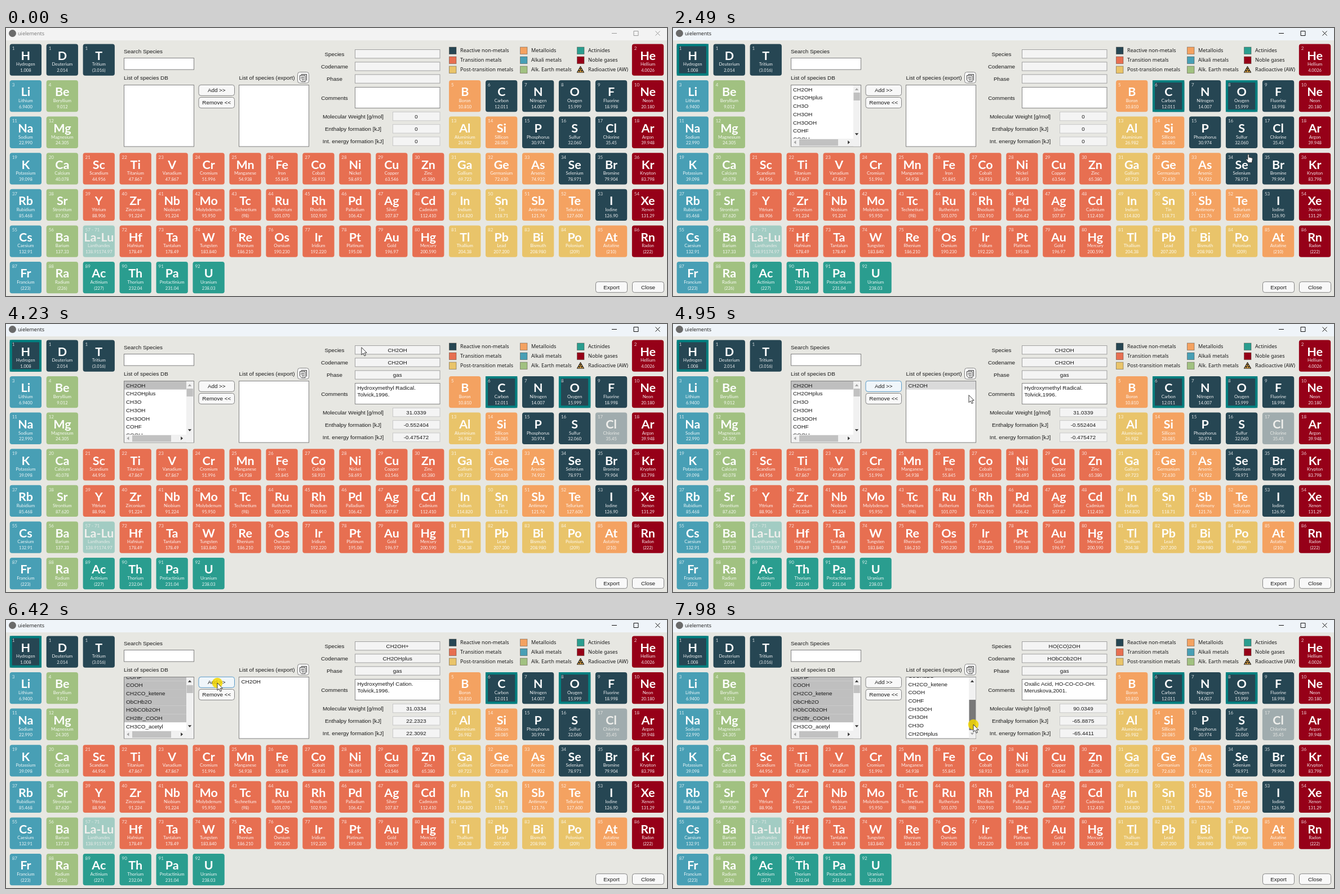
These frames come from a looping animation (1173x477 px, 8000 ms). An HTML page:

```html
<!DOCTYPE html>
<html lang="en">
<head>
<meta charset="utf-8">
<title>uielements</title>
<style>
html, body { margin: 0; width: 100%; height: 100%; overflow: hidden; background: #e7e7e2; }
svg { display: block; width: 100vw; height: 100vh; }
text { font: 9.85px "Liberation Sans", Arial, sans-serif; fill: #1a1a1a; white-space: pre; }
.mid { text-anchor: middle; }
.sym { font: 700 21.5px Lato, sans-serif; fill: #fff; }
.name { font: 7.8px Lato, sans-serif; fill: #fff; fill-opacity: .92; }
.mass { font: 7.6px Lato, sans-serif; fill: #fff; fill-opacity: .92; }
.num { font: 8px Lato, sans-serif; fill: #fff; fill-opacity: .8; }
.key { font: 9.15px "Noto Sans", "Open Sans", sans-serif; }
.title { font: 9.1px "Open Sans", "Noto Sans", sans-serif; }
</style>
</head>
<body>
<svg id="stage" viewBox="0 0 1173 477" preserveAspectRatio="none"></svg>
<script>
const LOOP = 8000, STEP = 30, ROW = 14.72;
const stage = document.getElementById('stage');

function el(tag, attrs, parent = stage, text) {
  const node = document.createElementNS('http://www.w3.org/2000/svg', tag);
  set(node, attrs);
  if (text !== undefined) node.textContent = text;
  parent.appendChild(node);
  return node;
}
function set(node, attrs) {
  for (const k in attrs) node.setAttribute(k, attrs[k]);
}
function box(x, y, w, h, fill, stroke = 'none', rx = 0, parent = stage) {
  return el('rect', { x, y, width: w, height: h, fill, stroke, rx }, parent);
}
// y is the middle of the line
function label(x, y, text, cls = '', parent = stage) {
  return el('text', { x, y: y + 3.5, class: cls }, parent, text);
}
function show(node, on) { node.style.display = on ? '' : 'none'; }

// ---- title bar
box(0, 0, 1173, 477, '#e7e7e2');
const bar = box(0, 0, 1173, 22, '#f3f3f3');
el('circle', { cx: 11.5, cy: 9.5, r: 6.5, fill: '#6a6a6a' });
const title = label(21, 9.5, 'uielements', 'title');
const controls = el('path', { d: 'M1075 9.5h9M1114 5.5h8v8h-8zM1152.5 5.5l8 8M1160.5 5.5l-8 8', fill: 'none' });

// ---- periodic table
const colours = {
  n: '#264653', t: '#e76f51', p: '#e9c46a', m: '#f4a261', k: '#489fb5',
  e: '#a1c181', a: '#2a9d8f', g: '#960018', l: '#2a9d8f'
};
const table = [
  ['nnng', 'H Hydrogen 1.008,D Deuterium 2.014,T Tritium (3.016),He Hellium 4.0026'],
  ['kemnnnng', 'Li Lithium 6.9400,Be Beryllium 9.012,B Boron 10.810,C Carbon 12.011,N Nitrogen 14.007,O Oxygen 15.999,F Fluorine 18.998,Ne Neon 20.180'],
  ['kepmnnng', 'Na Sodium 22.990,Mg Magnesium 24.305,Al Aluminium 26.982,Si Sillicon 28.085,P Phosphorus 30.974,S Sulfur 32.060,Cl Chlorine 35.45,Ar Argon 39.948'],
  ['kettttttttttpmmnng', 'K Potassium 39.098,Ca Calcium 40.078,Sc Scandium 44.956,Ti Titanium 47.867,V Vanadium 47.867,Cr Cromium 51.996,Mn Manganese 54.938,Fe Iron 55.845,Co Cobalt 58.933,Ni Nickel 58.693,Cu Copper 63.546,Zn Zinc 65.380,Ga Gallium 69.723,Ge Germanium 72.630,As Arsenic 74.922,Se Selenium 78.971,Br Bromine 79.904,Kr Krypton 83.798'],
  ['kettttttttttppmmng', 'Rb Rubidium 85.468,Sr Strontium 87.620,Y Yttrium 88.906,Zr Zirconium 91.224,Nb Niobium 91.224,Mo Molybdenum 95.950,Tc Technetium (98),Ru Rutherium 101.070,Rh Rhodium 102.910,Pd Palladium 106.42,Ag Silver 107.87,Cd Cadmium 112.410,In Indium 114.820,Sn Tin 118.71,Sb Antimony 121.76,Te Tellurium 127.600,I Iodine 126.90,Xe Xenon 131.29'],
  ['keltttttttttppppmg', 'Cs Caesium 132.91,Ba Barium 137.33,La-Lu Lanthandes 138.91174.97,Hf Hafnium 178.49,Ta Tantalum 178.49,W Tungsten 183.840,Re Rhenium 186.210,Os Osmium 190.230,Ir Iridium 192.220,Pt Platinum 195.08,Au Gold 196.97,Hg Mercury 200.590,Tl Thallium 204.38,Pb Lead 207.200,Bi Bismuth 208.980,Po Polonium (209),At Astatine (210),Rn Radon (222)'],
  ['keaaaa', 'Fr Francium (223),Ra Radium (226),Ac Actinium (227),Th Thorium 232.04,Pa Protactinium 231.04,U Uranium 238.03']
];
const tiles = {};
let count = 0;
table.forEach(([kinds, line], row) => line.split(',').forEach((item, i) => {
  const [sym, name, mass] = item.split(' ');
  const col = row === 0 && i === 3 ? 17 : (row === 1 || row === 2) && i > 1 ? i + 10 : i;
  if (sym !== 'D' && sym !== 'T') count++;
  let num = count;
  if (kinds[i] === 'l') { num = '57 - 71'; count = 71; }
  const x = 6.7 + col * 64.95, y = 28.4 + row * 64.6, cx = x + 28.2;
  const g = el('g', { opacity: kinds[i] === 'l' ? .36 : 1 });
  box(x, y, 56.3, 56.3, colours[kinds[i]], 'none', 4, g);
  const ring = el('rect', { x: x + 2, y: y + 2, width: 52.3, height: 52.3, fill: 'none', stroke: '#008080', 'stroke-width': 4 }, g);
  show(ring, false);
  el('text', { x: x + 4, y: y + 10.8, class: 'num' }, g, num);
  el('text', { x: cx, y: y + 28.3, class: 'sym mid' }, g, sym);
  el('text', { x: cx, y: y + 39, class: 'name mid' }, g, name);
  el('text', { x: cx, y: y + 49.8, class: 'mass mid' }, g, mass);
  tiles[sym] = { x, y, g, ring };
}));

// ---- legend
[[786, ['Reactive non-metals', 'Transition metals', 'Post-transition metals'], 'ntp'],
 [912, ['Metalloids', 'Alkali metals', 'Alk. Earth metals'], 'mke'],
 [1013, ['Actinides', 'Noble gases', 'Radioactive (AW)'], 'ag']
].forEach(([x, names, kinds]) => names.forEach((name, i) => {
  const y = 40 + i * 17;
  if (kinds[i]) box(x + .5, y - 6, 12.5, 12.5, colours[kinds[i]], 'rgba(60,50,40,.45)');
  label(x + 20, y - .2, name, 'key');
}));
el('path', { d: 'M1019.5 68.5l6 10.5h-12z', fill: '#f5b041', stroke: '#222', 'stroke-width': 1.2, 'stroke-linejoin': 'round' });
for (const a of [0, 120, 240])
  el('path', { d: 'M0 0L-1.8 3.1A3.6 3.6 0 0 0 1.8 3.1Z', fill: '#222', transform: `translate(1019.5 75) rotate(${a + 60})` });

// ---- left and middle panels
label(209, 41, 'Search Species');
label(209, 88, 'List of species DB');
label(413.5, 88, 'List of species (export)');
box(209.5, 53.5, 124, 20.5, '#fff', '#808080');

function button(x, y, w, text) {
  const r = box(x, y, w, 19, '#f8f8f8', '#858585', 4);
  label(x + w / 2, y + 9.4, text, 'mid');
  return r;
}
const add = button(342, 101.3, 63.5, 'Add >>');
button(342, 123.4, 63.5, 'Remove <<');
button(1046.5, 451.7, 56, 'Export');
button(1111.5, 451.7, 56, 'Close');
box(517.5, 78.5, 20, 19.5, '#f8f8f8', '#858585', 4);
el('path', { d: 'M524 82.5h9.5v11M524 82.5v1', fill: 'none', stroke: '#333' });
el('path', { d: 'M521.5 84.5h9.5v11h-6.5l-3-3zM523.5 87.5h5.5M523.5 90h5.5M525 92.5h4', fill: '#fff', stroke: '#222', 'stroke-width': .9 });

// ---- details panel
['Species', 'Codename', 'Phase'].forEach((s, i) => label(583, 46.3 + i * 22.2, s, 'mid'));
label(583, 124, 'Comments', 'mid');
const fields = [0, 1, 2].map(i => {
  box(619.5, 38.5 + i * 22.2, 150.5, 15.3, '#f4f4f4', '#a0a0a0');
  return label(694.7, 46.1 + i * 22.2, '', 'mid');
});
box(619.5, 105.5, 150.5, 37, '#fff', '#858585');
const notes = [label(623.5, 113.7, ''), label(623.5, 125.1, '')];
['Molecular Weight [g/mol]', 'Enthalpy formation [kJ]', 'Int. energy formation [kJ]'].forEach((s, i) => {
  const y = 157.2 + i * 22.2;
  label(616, y, s, 'mid');
  box(686.5, y - 7.7, 83.5, 15.4, '#f4f4f4', '#c8c8c8');
  fields.push(label(728, y, '0', 'mid'));
});
const details = [
  ['', '', '', '0', '0', '0', '', ''],
  ['CH2OH', 'CH2OH', 'gas', '31.0339', '-0.552404', '-0.475472', 'Hydroxymethyl Radical.', 'Tolvick,1996.'],
  ['CH2OH+', 'CH2OHplus', 'gas', '31.0334', '22.2323', '22.3092', 'Hydroxymethyl Cation.', 'Tolvick,1996.'],
  ['HO(CO)2OH', 'HObCOb2OH', 'gas', '90.0349', '-65.8875', '-65.4411', 'Oxalic Acid, HO-CO-CO-OH.', 'Meruskova,2001.']
];

// ---- list boxes
function listBox(x, id, textX, clipW, clipH) {
  box(x, 101.5, 124, 109.5, '#fff', '#808080');
  const clip = el('clipPath', { id });
  box(x + .5, 102, clipW, clipH, '#000', 'none', 0, clip);
  const g = el('g', { 'clip-path': `url(#${id})` });
  const rows = Array.from({ length: 13 }, () => ({
    back: box(x + .5, 0, 123, ROW + .1, 'none', 'none', 0, g),
    text: label(textX, 0, '', '', g)
  }));
  return (items, scroll, picked, hover) => rows.forEach((r, i) => {
    const y = 101.8 + i * ROW - scroll;
    set(r.back, { y, fill: picked(i) && items[i] ? '#bfbfbf' : i === hover ? '#dadada' : 'none' });
    r.text.setAttribute('y', y + 10.9);
    r.text.textContent = items[i] || '';
  });
}
function tri(x, y, turn, parent = stage) {
  return el('path', { d: 'M-3.2 1.8L0 -2L3.2 1.8Z', transform: `translate(${x} ${y}) rotate(${turn})`, fill: '#333' }, parent);
}
const drawBase = listBox(209.5, 'baseClip', 213, 110, 95);
const drawOut = listBox(413.5, 'outClip', 417.5, 123, 108.5);

const baseBar = el('g', {});
box(320, 102, 13, 108.5, '#f1f1f1', 'none', 0, baseBar);
box(210, 197, 123, 13.5, '#f1f1f1', 'none', 0, baseBar);
const baseUp = tri(326, 109, 0, baseBar);
tri(326, 189, 180, baseBar);
set(tri(216.5, 203.5, -90, baseBar), { fill: '#a3a3a3' });
tri(312, 203.5, 90, baseBar);
box(224, 198, 69, 11.5, '#c1c1c1', 'none', 0, baseBar);
const baseThumb = box(320.5, 115, 11.5, 14, '#c1c1c1', 'none', 0, baseBar);

const outBar = el('g', {});
box(525, 102, 12.5, 108.5, '#f1f1f1', 'none', 0, outBar);
const outUp = tri(531, 109, 0, outBar), outDown = tri(531, 202.5, 180, outBar);
const outThumb = box(525.5, 114, 11.5, 54, '#c1c1c1', 'none', 0, outBar);

const metals = 'ALHCL ALHCL2 ALHFCL ALH2CL ALOHCL ALOHCL2 ALbOHb2CL'.split(' ');
const organics = 'CH2OH CH2OHplus CH3O CH3OH CH3OOH COHF COOH CH2CO_ketene ObCHb2O HObCOb2OH CH2Br_COOH CH3CO_acetyl'.split(' ');
const exported = [organics[0], ...organics.slice(1, 11).reverse()];

// ---- pointer
const halo = el('circle', { r: 9.3, fill: '#f2d600', 'fill-opacity': .85 });
const arrow = el('path', { d: 'M0 0V13.2L3.1 10.4L5.2 15.2L7.4 14.2L5.3 9.6H9.3Z', fill: '#fff', stroke: '#222', 'stroke-width': .9 });
const hand = el('path', {
  d: 'M-1.2 1C-1.2 -.5 1.2 -.5 1.2 1V5.2L6 6.2C7.2 6.6 7.5 7.4 7.3 8.6L6.3 14.8H-.2L-3.8 9.7C-4.3 8.5 -3 8 -2.2 8.6L-1.2 9.5Z',
  fill: '#fff', stroke: '#222', 'stroke-width': .9, 'stroke-linejoin': 'round'
});

// time, x, y
const path = [
  [30, 585, 443], [420, 250, 250], [720, 33, 60], [900, 33, 60], [1080, 430, 215],
  [1230, 886, 121.5], [1350, 886, 121.5], [1650, 1008, 122], [1830, 1008, 122],
  [2100, 1045, 200], [2280, 960, 218], [2460, 1040, 222], [2610, 858, 250],
  [2820, 960, 346], [3030, 1138, 300], [3200, 1076, 184], [3330, 1076, 184],
  [3540, 589, 128.5], [3720, 250, 111], [3930, 250, 111], [4260, 640, 40],
  [4410, 765, 120], [4530, 715, 232], [4650, 375, 112], [4770, 375, 112],
  [4950, 525, 126.5], [5160, 470, 200], [5310, 260, 126], [5460, 260, 126],
  [5820, 277, 139], [6030, 270, 176], [6150, 270, 176], [6300, 375, 112],
  [6540, 375, 112], [6780, 531, 132], [6840, 531, 132], [7050, 531, 160],
  [7170, 531, 160], [7260, 531, 132], [7320, 531, 132], [7440, 450, 139],
  [7530, 450, 139], [7710, 533, 158], [7770, 533, 158], [7950, 533, 186]
];
const presses = [[780, 870], [1200, 1290], [1710, 1800], [3210, 3300], [3750, 3840], [4680, 4770],
  [5340, 5430], [6060, 6150], [6360, 6450], [6810, 7290], [7470, 7530], [7740, LOOP]];

const clamp = v => Math.max(0, Math.min(1, v));
const ease = v => v * v * (3 - 2 * v);
function pointer(t) {
  const i = path.findIndex(p => p[0] > t);
  if (i < 0) return path[path.length - 1].slice(1);
  if (i === 0) return path[0].slice(1);
  const [t0, x0, y0] = path[i - 1], [t1, x1, y1] = path[i];
  const k = ease((t - t0) / (t1 - t0));
  return [x0 + (x1 - x0) * k, y0 + (y1 - y0) * k];
}
const rowAt = (y, scroll) => Math.floor((y - 2 - 101.8 + scroll) / ROW);

function draw(t) {
  const [x, y] = pointer(t);
  const pressed = presses.some(([a, b]) => t >= a && t < b);

  // window focus
  const active = t >= 240;
  bar.setAttribute('fill', active ? '#eff4f9' : '#f3f3f3');
  title.style.fill = active ? '#1a1a1a' : '#777';
  controls.setAttribute('stroke', active ? '#111' : '#999');

  // tiles
  show(tiles.H.ring, t >= 870);
  show(tiles.C.ring, t >= 1290);
  show(tiles.O.ring, t >= 1800);
  tiles.Cl.g.setAttribute('opacity', t >= 3300 ? .36 : 1);

  // database list
  const base = t < 900 ? [] : t < 1830 ? metals : organics;
  const scroll = 81.7 * ease(clamp((t - 5550) / 150));
  const picked = i => t >= 6090 ? i > 0 && i < 11 : t >= 5370 ? i === 1 : t >= 3810 && i === 0;
  const inRows = y > 102 && y < 210;
  drawBase(base, scroll, picked, x > 210 && x < 320 && inRows && base.length ? rowAt(y, scroll) : -1);
  show(baseBar, base.length);
  baseThumb.setAttribute('y', 115 + scroll / 81.7);
  baseUp.setAttribute('fill', scroll > 1 ? '#333' : '#a3a3a3');

  // export list
  const full = t >= 6450;
  const out = full ? exported : t >= 4770 ? exported.slice(0, 1) : [];
  const dragging = t >= 6810 && t < 7290 || t >= 7740;
  const drag = dragging ? clamp((y - (t < 7500 ? 132 : 158)) / 28) : 0;
  const overOut = x > 414 && x < (full ? 525 : 537) && inRows;
  drawOut(out, drag * 54, i => t >= 7500 && i === 2,
    overOut ? Math.min(rowAt(y, drag * 54), out.length - 1) : -1);
  show(outBar, full);
  set(outThumb, { y: 114 + drag * 28, fill: dragging ? '#787878' : '#c1c1c1' });
  outUp.setAttribute('fill', drag > .02 ? '#333' : '#a3a3a3');
  outDown.setAttribute('fill', drag < .98 ? '#333' : '#a3a3a3');

  // details
  const info = details[t >= 7500 ? 3 : t >= 5370 ? 2 : t >= 3810 ? 1 : 0];
  [...fields, ...notes].forEach((f, i) => { f.textContent = info[i]; });
  const focus = t >= 4680 && t < 5340 || t >= 6360 && t < 6810;
  set(add, { stroke: focus ? '#5a9bc8' : '#858585', fill: focus ? '#f0f6fa' : '#f8f8f8' });

  // pointer
  const onTile = Object.values(tiles).some(b => x > b.x && x < b.x + 56 && y > b.y && y < b.y + 56);
  const at = { transform: `translate(${x} ${y})` };
  [halo, arrow, hand].forEach(n => set(n, at));
  show(halo, pressed);
  show(hand, t >= STEP && onTile);
  show(arrow, t >= STEP && !onTile);
}

const start = performance.now();
function tick() {
  const t = (performance.now() - start) % LOOP;
  draw(Math.floor(t / STEP) * STEP);
  requestAnimationFrame(tick);
}
tick();
</script>
</body>
</html>
```
